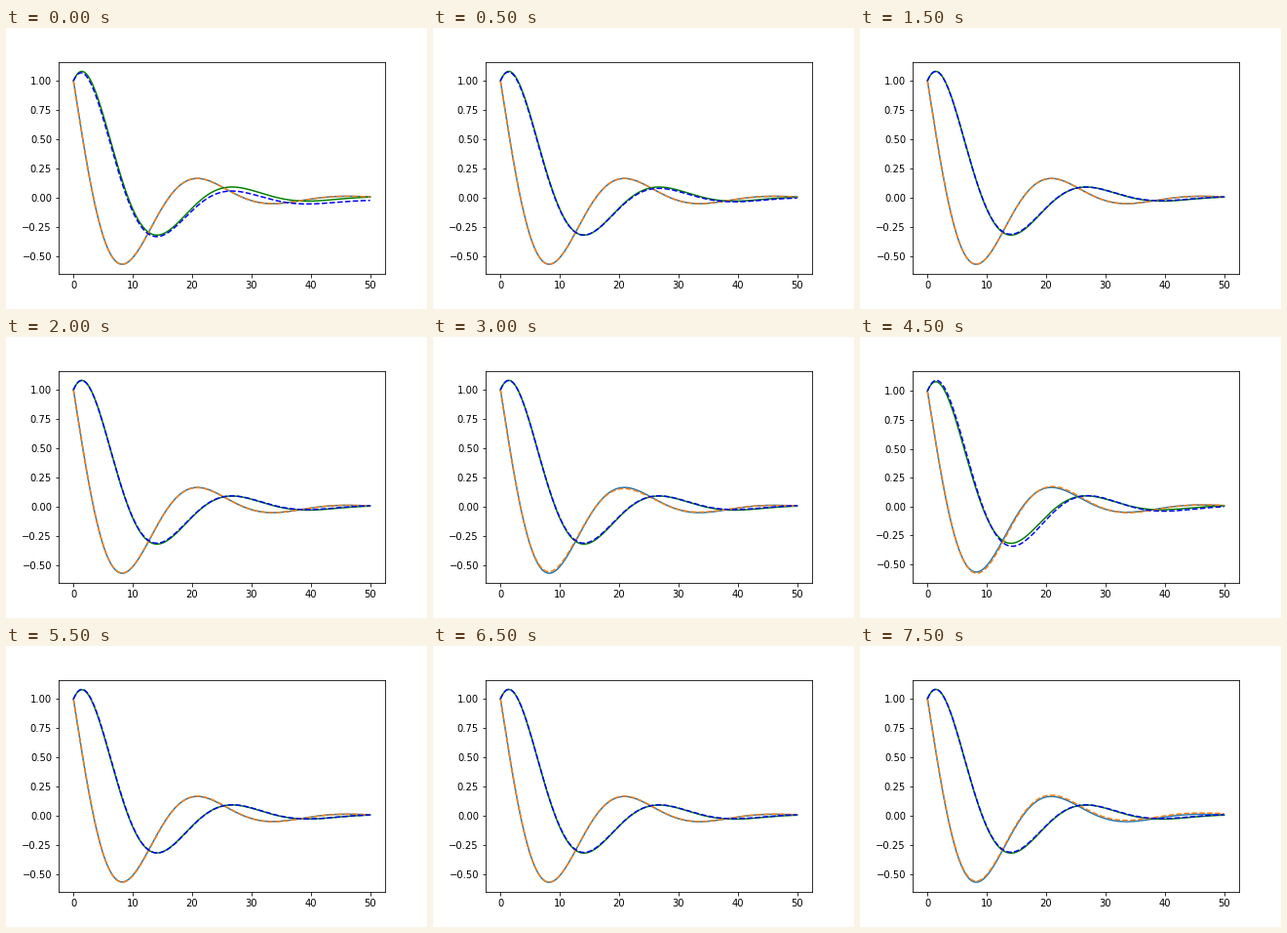
Recreate the animation shown at these times as a matplotlib script. Size 432x288 px, loop 8000 ms.

```python
import numpy as np
import matplotlib.pyplot as plt
from matplotlib.animation import FuncAnimation

FRAMES, INTERVAL = 16, 500
DECAY, FREQ = 0.0967, 0.248
X_SINE, Y_SINE = -0.9, 0.875
JOLT_STEP = 9

t = np.linspace(0, 50, 501)


def spiral(sine, d_decay=0, d_freq=0, offset=0):
    """Damped oscillation from 1 that settles at a small offset."""
    phase = (FREQ + d_freq) * t
    wave = np.cos(phase) + sine * np.sin(phase)
    return np.exp(-(DECAY + d_decay) * t) * wave + offset * (1 - np.exp(-t / 4))


def bump(step, centre, width):
    return np.exp(-((step - centre) / width) ** 2)


def jolt(step):
    """Sudden loss of accuracy that is quickly learned away."""
    return np.exp((JOLT_STEP - step) / 1.5) if step >= JOLT_STEP else 0


def fit_x(step):
    kick = jolt(step)
    return spiral(X_SINE,
                  d_decay=0.003 * (bump(step, 6, 1.5) - kick),
                  d_freq=-0.002 * kick,
                  offset=0.011 * bump(step, FRAMES - 1, 1.5))


def fit_y(step):
    start, kick = np.exp(-step), jolt(step)
    return spiral(Y_SINE + 0.03 * kick,
                  d_decay=0.001 + 0.002 * start - 0.005 * kick,
                  d_freq=-0.002 * kick,
                  offset=0.004 - 0.031 * start - 0.012 * kick)


plt.rcParams["font.family"] = "DejaVu Sans"
fig, ax = plt.subplots(figsize=(6, 4), dpi=72)
fig.subplots_adjust(left=0.125, right=0.9, bottom=0.125, top=0.88)

ax.plot(t, spiral(X_SINE), "-", color="C0")
ax.plot(t, spiral(Y_SINE), "g-")
x_line, = ax.plot(t, fit_x(0), "--", color="C1")
y_line, = ax.plot(t, fit_y(0), "b--")


def update(step):
    x_line.set_ydata(fit_x(step))
    y_line.set_ydata(fit_y(step))
    ax.relim()
    ax.autoscale_view()
    return x_line, y_line


anim = FuncAnimation(fig, update, frames=FRAMES, interval=INTERVAL,
                     repeat=True, repeat_delay=0, blit=False)
plt.show()
```
